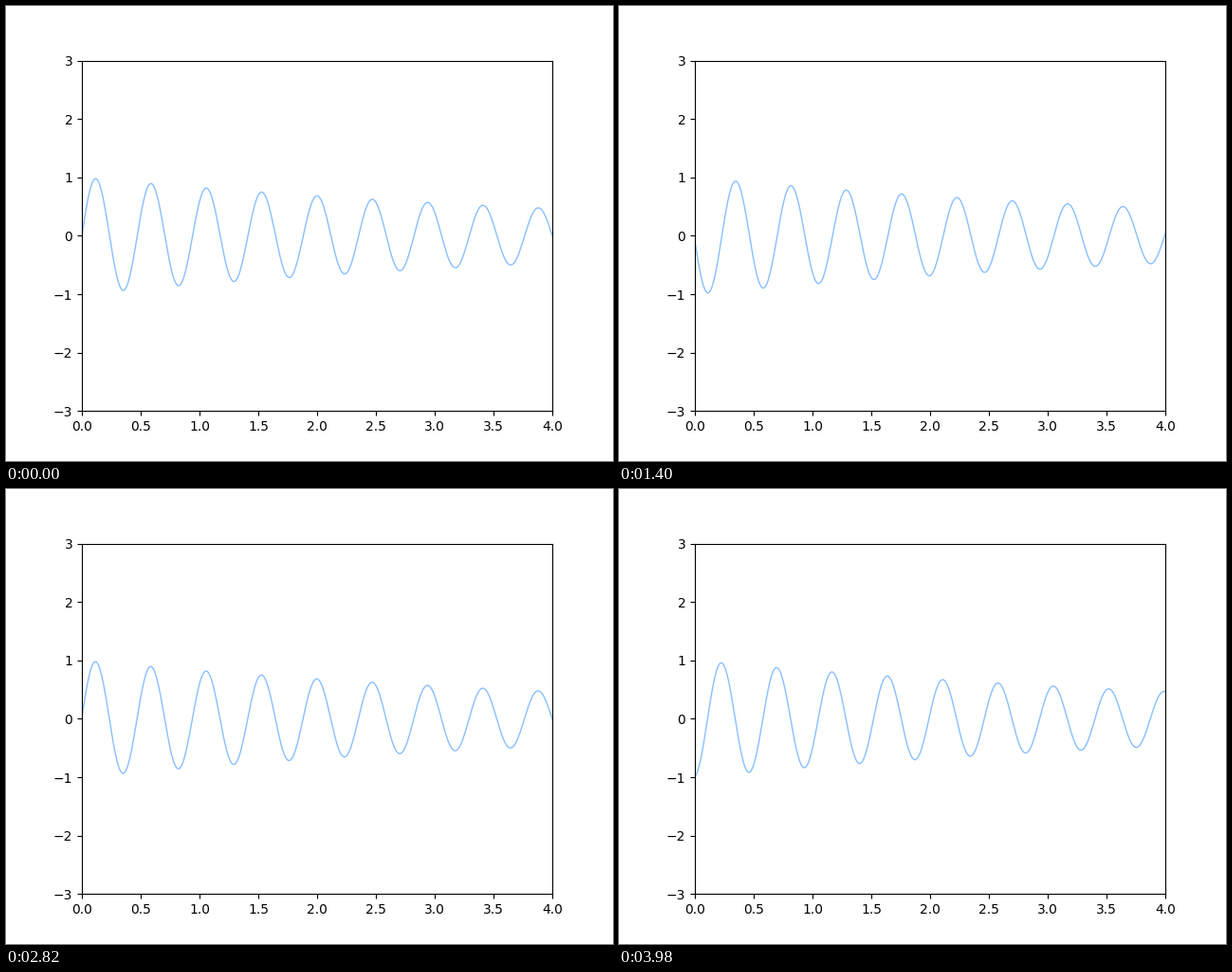
Animation, 640 px wide and 480 px high, one loop 4000 ms. Source, as a matplotlib script:

```python
import numpy as np
import matplotlib.pyplot as plt
from matplotlib.animation import FuncAnimation

FRAMES = 200
INTERVAL = 20            # ms
K = 17 * np.pi / 4       # wave number
DECAY = 0.19
STEP = 0.01              # shift to the right per frame

fig = plt.figure(figsize=(6.4, 4.8), dpi=100)
ax = plt.axes(xlim=(0, 4), ylim=(-3, 3))
x = np.linspace(0, 4, 1000)
line, = ax.plot([], [], lw=1, color="#88bfff")


def init():
    line.set_data([], [])
    return line,


def animate(i):
    line.set_data(x, np.exp(-DECAY * x) * np.sin(K * (x - STEP * i)))
    return line,


anim = FuncAnimation(fig, animate, init_func=init, frames=FRAMES,
                     interval=INTERVAL, blit=True, repeat=True, repeat_delay=0)
plt.show()
```
